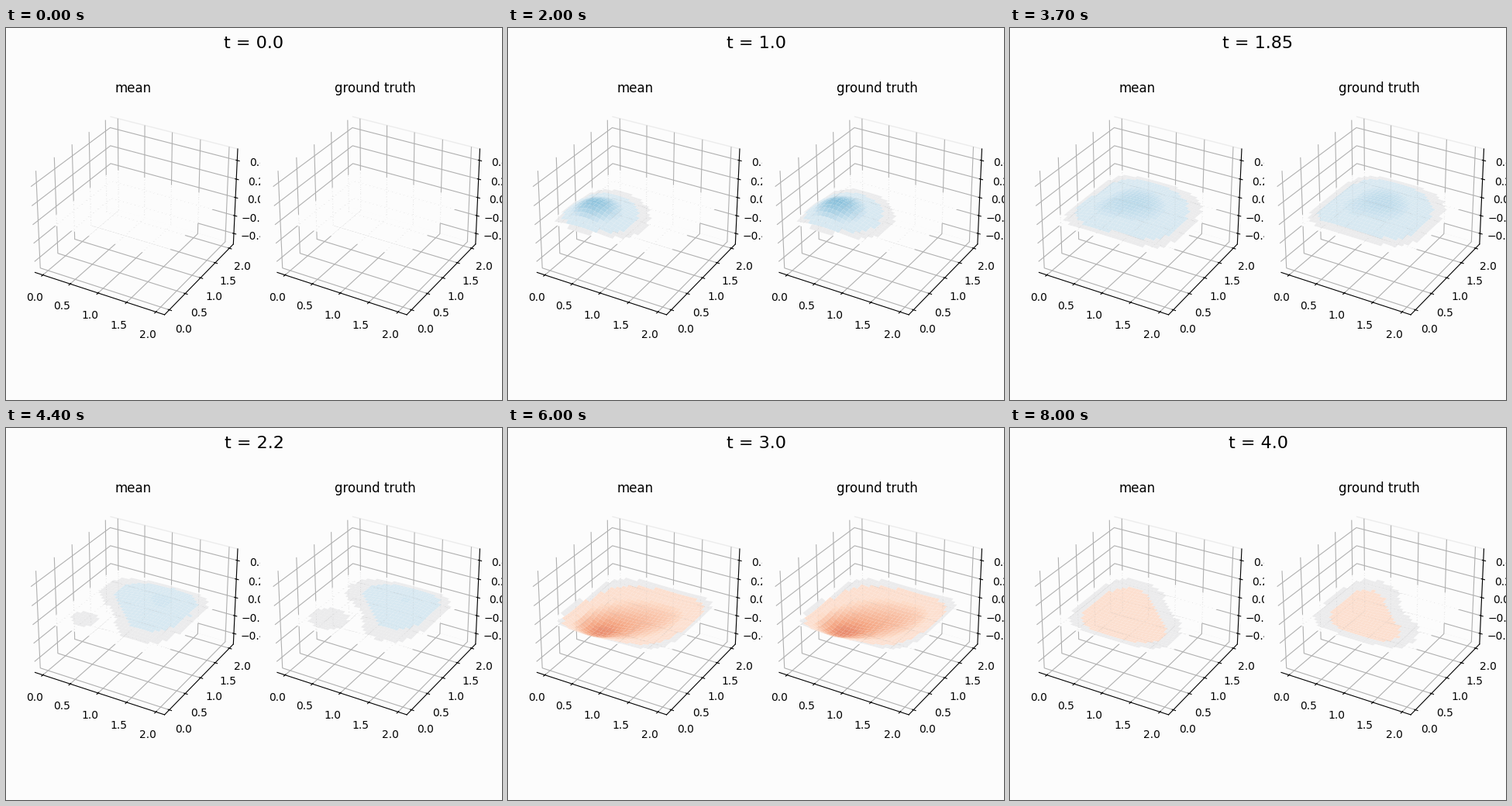
Recreate the animation shown at these times as a matplotlib script. Size 640 px wide and 480 px high, loop 8100 ms.

```python
import numpy as np
import matplotlib.pyplot as plt
from matplotlib.animation import FuncAnimation
from matplotlib.colors import ListedColormap, to_rgba

WIDTH, HEIGHT, DPI = 640, 480, 100
BACKGROUND = "#fcfcfc"
FRAMES, TIME_STEP = 81, 0.05
SIDE = 2.0                # membrane edge length
DRIVE = np.pi / 2         # angular frequency of the driving force
CENTRE, SIGMA, STRENGTH = 0.5, 0.2, 0.70
MEAN_LAG = 0.04

plt.rcParams["font.family"] = "DejaVu Sans"

# Sine modes of a square membrane with fixed edges
modes = np.arange(1, 13)
grid = np.linspace(0, SIDE, 30)
basis = np.sin(np.outer(modes, grid) * np.pi / SIDE)
at_centre = np.sin(modes * np.pi * CENTRE / SIDE)
wave_sq = (np.pi / SIDE) ** 2 * np.add.outer(modes ** 2, modes ** 2)
omega = np.sqrt(wave_sq)
weights = (STRENGTH * (np.pi / SIDE) ** 2 * np.outer(at_centre, at_centre)
           * np.exp(-wave_sq * SIGMA ** 2 / 2) / (wave_sq - DRIVE ** 2))
weights *= (SIDE / np.pi) ** 2


def membrane(t):
    """Displacement of a membrane driven from rest by a Gaussian force."""
    response = np.sin(DRIVE * t) - DRIVE / omega * np.sin(omega * t)
    return basis.T @ (weights * response) @ basis


def soft_centre_cmap():
    """RdBu with flat steps around zero."""
    base = plt.get_cmap("RdBu")
    level = np.linspace(-1, 1, 512)
    size = np.abs(level)
    colors = base((level + 1) / 2)
    pale = (size >= 0.08) & (size < 0.19)
    colors[pale] = base((np.sign(level[pale]) * 0.17 + 1) / 2)
    colors[size < 0.08] = to_rgba("#ebebec")
    colors[size < 0.03] = to_rgba(BACKGROUND)
    return ListedColormap(colors)


X, Y = np.meshgrid(grid, grid)


def quads(z):
    points = np.stack([X, Y, z], axis=-1)
    corners = [points[:-1, :-1], points[:-1, 1:], points[1:, 1:], points[1:, :-1]]
    return np.stack(corners, axis=2).reshape(-1, 4, 3)


def make_panel(left, title):
    size, bottom = 297.5, 91.25
    ax = fig.add_axes([left / WIDTH, bottom / HEIGHT, size / WIDTH, size / HEIGHT],
                      projection="3d", facecolor=BACKGROUND)
    surface = ax.plot_surface(X, Y, np.zeros_like(X), cmap=cmap,
                              vmin=-0.4, vmax=0.4)
    pad = 25 / 24
    ax.set_xlim(1 - 1.1 * pad, 1 + 1.1 * pad)
    ax.set_ylim(1 - 1.1 * pad, 1 + 1.1 * pad)
    ax.set_zlim(-0.5 * pad, 0.5 * pad)
    ax.set_xticks(np.arange(5) * 0.5)
    ax.set_yticks(np.arange(5) * 0.5)
    ax.set_zticks(np.arange(-2, 3) * 0.2)
    for axis in (ax.xaxis, ax.yaxis, ax.zaxis):
        axis.set_pane_color(BACKGROUND)
    ax.yaxis.pane.set_edgecolor("#ececec")
    ax.set_title(title, fontsize=12)
    return surface


def set_height(surface, z):
    faces = quads(z)
    surface.set_verts(list(faces))
    surface.set_array(faces[:, :, 2].mean(axis=1))


fig = plt.figure(figsize=(WIDTH / DPI, HEIGHT / DPI), dpi=DPI, facecolor=BACKGROUND)
cmap = soft_centre_cmap()
mean_surface = make_panel(15, "mean")
truth_surface = make_panel(327.5, "ground truth")
clock = fig.suptitle("t = 0.0", fontsize=16)


def update(frame):
    t = frame * TIME_STEP
    set_height(mean_surface, membrane(max(t - MEAN_LAG, 0.0)))
    set_height(truth_surface, membrane(t))
    clock.set_text(f"t = {t}")
    return mean_surface, truth_surface, clock


anim = FuncAnimation(fig, update, frames=FRAMES, init_func=lambda: update(0),
                     interval=100, repeat=True, repeat_delay=0, blit=False)
plt.show()
```
